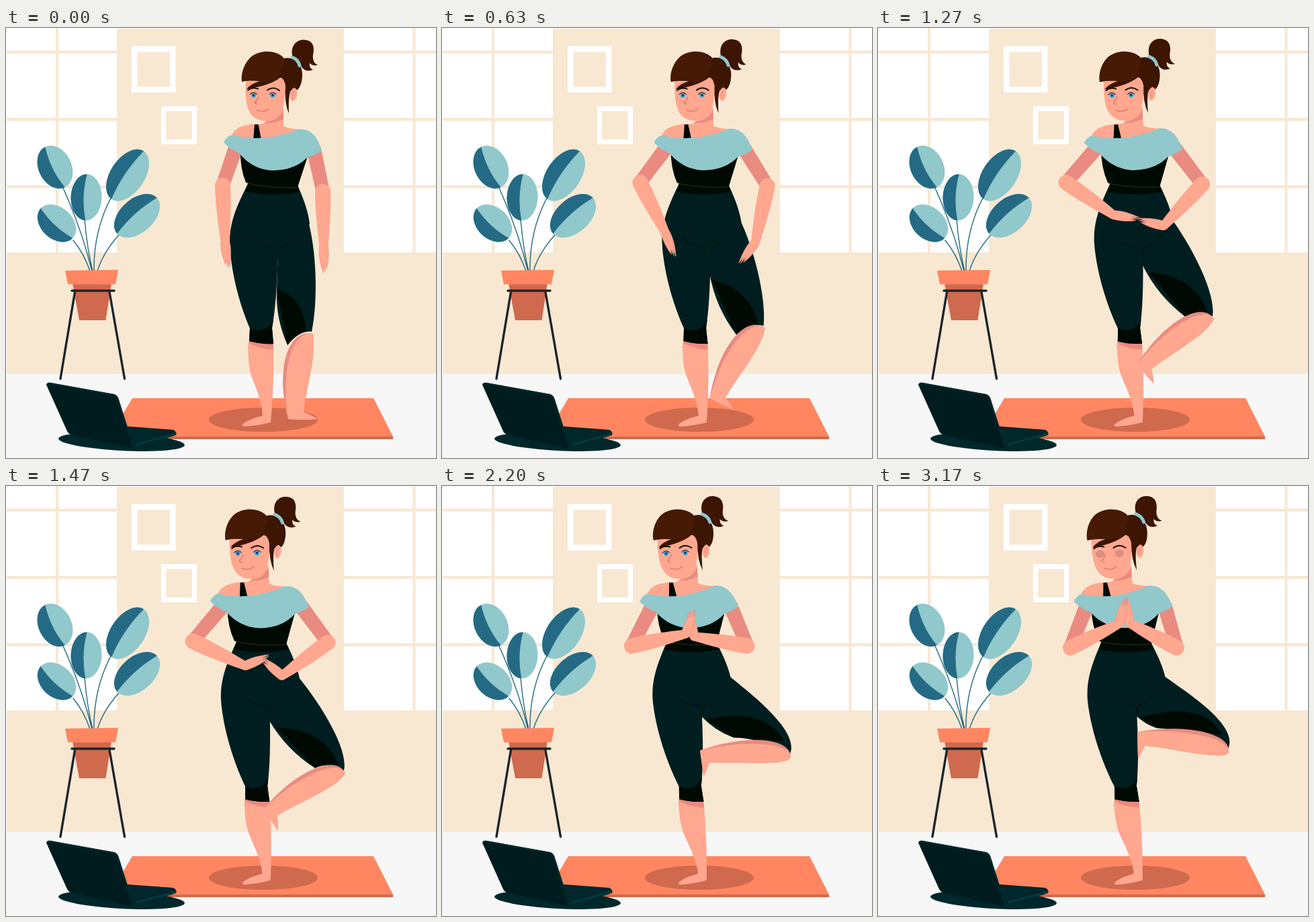
These frames come from a looping animation (640 px wide and 640 px high, 4.83 s). An HTML page:

```html
<!DOCTYPE html>
<html lang="en">
<head>
<meta charset="utf-8">
<title>Tree pose</title>
<style>
html, body { margin: 0; width: 100%; height: 100%; overflow: hidden; background: #fff; }
svg { display: block; width: 100vw; height: 100vh; }
.skin { fill: #ffa78f; } .shade { fill: #e98b80; }
.pants { fill: #001e20; } .black { fill: #000a02; }
.aqua { fill: #90c8cc; } .blue { fill: #246a84; }
.coral { fill: #ff8660; } .rust { fill: #cf6a4e; }
.wall { fill: #f8e8d2; } .hair { fill: #3c1503; }
.line { fill: none; stroke-linecap: round; }
</style>
</head>
<body>
<svg viewBox="0 0 640 640">
  <rect class="wall" x="1" y="1" width="639" height="515"/>
  <path fill="#fff" d="M0 0H165V334H0ZM503 0H640V334H503Z"/>
  <g id="bars" class="wall"></g>
  <rect y="515" width="640" height="125" fill="#f7f7f7"/>
  <g fill="none" stroke="#fff">
    <rect x="191.2" y="31.2" width="57" height="60.5" stroke-width="8.5"/>
    <rect x="234.5" y="120" width="46" height="49.5" stroke-width="7.2"/>
  </g>

  <path class="line" stroke="#246a84" stroke-width="1.4" d="M84 236Q113 300 128 362M117 285Q121 330 129 362M157 251Q130 302 131 362M168 308Q144 335 136 362M100 316Q117 337 125 362"/>
  <g id="leaves"></g>
  <path class="rust" d="M99 380H157L148.500 435H109Z"/>
  <path class="coral" d="M88 361L167 360L163 381.500H92Z"/>
  <path class="line" stroke="#1d252c" stroke-width="3.4" d="M98 391H161M102.500 393L81 522M154 393L176.500 522"/>

  <path class="rust" d="M154 608H576V612H154Z"/>
  <path class="coral" d="M188 551H547L576 608H154Z"/>
  <ellipse class="rust" cx="383" cy="583" rx="81" ry="18"/>

  <ellipse cx="172" cy="616" rx="94" ry="13" fill="#00272b" transform="rotate(3 172 616)"/>
  <path d="M168 592L249 598Q255 601 253 606L190 626Z" fill="#00272b"/>
  <path class="line" d="M194 620L252 604" stroke="#003a3f" stroke-width="3"/>
  <path d="M60 531Q61 527 67 528L160 545Q165 546 167 551L190 626L97 605Q93 604 91 600Z" fill="#001c1e"/>
  <path class="line" d="M64 529L160 546Q164 547 166 551L189 623" stroke="#00292c" stroke-width="2.500"/>

  <path id="upL" class="shade" d="M0 -11L60 -10V10L0 11Z"/>
  <path id="upR" class="shade" d="M0 -11L60 -10V10L0 11Z"/>

  <g class="hips">
    <path class="shade" d="M362 464L398 467V482L380 490L360 476Z"/>
    <path class="skin" d="M361 469Q378 478 398 479Q399 530 394 587Q375 592 355 593Q350 592 353 589Q362 582 382 577C381 552 368 528 364 514Q359 494 361 469Z"/>
    <path class="pants" d="M361 230C346 260 333 285 333 318C334 360 347 410 363 447L362 466Q380 471 398 470L396 446C402 415 404 370 405 328L452 292C450 272 441 250 434 234Z"/>
    <path class="black" d="M363 446Q386 457 398 434L396 447L398 470Q380 471 362 466Z"/>
    <path class="black" d="M361 229L433 233L437 244Q397 252 356 243Z"/>
  </g>
  <path id="thigh" class="pants"/>
  <path id="fold" class="black"/>
  <g class="hips">
    <path class="line" stroke="#000a02" d="M355 305Q376 325 405 328Q426 321 438 304M405 328V344"/>
  </g>
  <path id="calfBack" class="shade"/>
  <path id="calf" class="skin"/>

  <g class="torso">
    <path class="skin" d="M387 128L413 118V146Q420 150 438 151L440 168L335 172L336 159C341 150 350 144 371 143Q386 144 387 138Z"/>
    <path class="shade" d="M385 140Q405 138 413 122V136Q400 142 385 141.500Z"/>
    <path class="black" d="M349 180Q348 208 357 230Q390 239 434 237L450 188L400 170Z"/>
    <path class="line" d="M359 231Q390 239 433 237.500" stroke="#34403c" stroke-width=".7"/>
    <path class="black" d="M370 143.500H375.500L380 166L368 167Z"/>
    <path class="aqua" d="M324 170Q328 162 336 159Q383 172 437 150.500C455 150 465 164 470 183Q460 189 448 193C432 209 412 212 396 212C373 211 356 198 347 186Q335 182 324 170Z"/>
  </g>

  <g class="torso">
    <path class="hair" d="M427 45C421 24 436 15 447 18C459 20 459 32 457 40C456 48 459 53 464 55C459 57 454 55 452 52C451 58 454 61 457 62C448 66 441 62 438 54Z"/>
    <path class="skin" d="M357 76C356 100 357 116 363 126C370 137 384 141 396 136C408 131 414 118 415 100L420 75Z"/>
    <path class="hair" d="M403 50Q418 40 432 48Q442 58 441 72Q440 86 434 92L424 93Q420 100 421 127Q414 112 416 86Q414 74 408 74Q392 86 358 91Q364 83 378 79Z"/>
    <ellipse class="skin" cx="428" cy="99" rx="5.200" ry="10" transform="rotate(10 428 99)"/>
    <path class="line" stroke="#e98b80" d="M430 94Q425 97 427 104"/>
    <path fill="#461a04" d="M351 80C349 66 356 50 366 42C380 32 402 33 413 44C415 55 410 72 398 78C385 82 370 76 351 80Z"/>
    <path class="line" stroke="#90c8cc" stroke-width="5" stroke-linecap="butt" d="M426 43.500Q435 47 437 56"/>
    <g id="eyes"></g>
    <path class="line" stroke="#140800" stroke-width="1.900" d="M360 92.500Q366 87.500 375 90.500M389 92.500Q398 86 407 93"/>
    <path class="line" stroke="#c9705f" stroke-width="1.100" d="M376 102Q374 108 370 111Q371 113 374 113M373 122Q382 126.500 391 121"/>
    <clipPath id="lid"><rect id="lidBox" x="355" y="94.500" width="60" height="0"/></clipPath>
    <g id="lids" fill="#d98f7f" clip-path="url(#lid)"></g>
  </g>

  <g id="arms"></g>
</svg>
<script>
const $ = id => document.getElementById(id);
const LOOP = 4830, RISE = 2670;

// Steady motion that brakes to a stop at u = 1
function ease(u) {
  const speed = 1.12, brake = 2 / speed - 1;
  return u < brake ? speed * u : 1 - speed / 2 * (1 - u) ** 2 / (1 - brake);
}

const lerp = (a, b, s) => [a[0] + (b[0] - a[0]) * s, a[1] + (b[1] - a[1]) * s];
const add = (a, x, y) => [a[0] + x, a[1] + y];
const dist = (a, b) => Math.hypot(b[0] - a[0], b[1] - a[1]);

// Point on the Bezier curve through any number of control points
function track(s, ...pts) {
  while (pts.length > 1) pts = pts.slice(1).map((p, i) => lerp(pts[i], p, s));
  return pts[0];
}

// Local axes: u runs from a towards b, v to the left of it
function frame(a, b) {
  const len = dist(a, b), dx = (b[0] - a[0]) / len, dy = (b[1] - a[1]) / len;
  return (u, v) => [a[0] + dx * u + dy * v, a[1] + dy * u - dx * v];
}

// Shear above the standing foot plus a slight sideways lift
function tilt(s, lift) {
  const c = .0775 * s, b = lift * s;
  return {
    css: `matrix(1 ${-b} ${c} 1 ${-590 * c} ${380 * b})`,
    at: (x, y) => [x + c * (y - 590), y - b * (x - 380)]
  };
}

function path(id, ...parts) {
  $(id).setAttribute('d', parts.map(p => typeof p === 'string' ? p : p.map(n => n.toFixed(2)).join(' ')).join(' '));
}

function place(id, a, b, scale = 1, flip = 1) {
  const angle = Math.atan2(b[1] - a[1], b[0] - a[0]) * 180 / Math.PI;
  $(id).setAttribute('transform', `translate(${a}) rotate(${angle}) scale(${scale} ${flip})`);
}

function arm(side, shoulder, elbow, wrist, tip, flip) {
  place('up' + side, shoulder, elbow, dist(shoulder, elbow) / 60);
  place('fore' + side, elbow, wrist, dist(elbow, wrist) / 86);
  place('hand' + side, wrist, tip, 1, flip);
}

function drawThigh(s, low, knee) {
  const hip = low.at(449, 284), crotch = low.at(405, 328);
  const gap = low.at(403, 342 + 46 * (1 - s) ** 2);
  const hem = track(s, [419, 472], [432, 459], [507, 421], [414, 360]);
  const outer = frame(hip, knee), inner = frame(gap, hem);
  const len = dist(hip, knee), span = dist(gap, hem);
  const hemMid = add(lerp(knee, hem, .5), 0, -12);
  path('thigh', 'M', hip, 'C', outer(45, 11), outer(len - 50 + 37 * s, 12 + 26 * s * s), knee,
    'Q', hemMid, hem, 'Q', inner(span / 2, -.12 * span), gap, 'L', crotch, 'Z');

  const end = add(knee, -8, -23 * s * s);
  path('fold', 'M', lerp(gap, hem, .18 * s * (2 - s)), 'Q', add(end, -5 - 24 * s, -53), end,
    'Q', hemMid, hem, 'Z');
}

function drawCalf(s, knee) {
  const heel = track(s, [420, 582], [371, 542], [386, 366]);
  const toe = track(s, [464, 582], [401, 577], [387, 406]);
  const top = add(knee, 2, 3), leg = frame(top, heel), len = dist(top, heel);
  const sole = lerp(heel, toe, .5);
  const instep = lerp(sole, top, 11 / len);
  const shape = (id, inset) => {
    const bulge = -40 + 11 * s + inset;
    path(id, 'M', top, 'C', leg(3, bulge), leg(.53 * len, bulge * .95), heel,
      'Q', add(sole, 0, 2), toe, 'Q', add(lerp(toe, instep, .5), 1, -1), instep,
      'C', leg(.58 * len, 12), leg(34 * (1 - s), 15), top, 'Z');
  };
  shape('calfBack', 0);
  shape('calf', 8);
}

function draw(t) {
  const s = ease(Math.min(t / RISE, 1));
  const low = tilt(s, .02), high = tilt(s, .04);
  document.querySelectorAll('.hips').forEach(g => g.setAttribute('transform', low.css));
  document.querySelectorAll('.torso').forEach(g => g.setAttribute('transform', high.css));

  const knee = track(s, [455, 452], [504, 440], [520, 393]);
  drawThigh(s, low, knee);
  drawCalf(s, knee);

  arm('L', high.at(342, 178),
    track(s, [322.5, 234], [258, 222], [286, 241]),
    track(s, [326, 318], [319, 308], [381, 270], [359, 205]),
    track(s, [331.5, 357], [341, 392], [418, 209], [368, 166]), 1);
  arm('R', high.at(458, 180),
    track(s, [471.5, 243], [509, 223], [445, 241]),
    track(s, [473, 325], [500, 330], [367, 290], [374, 204]),
    track(s, [473, 366], [446, 396], [353, 219], [370, 167]), -1);

  const shut = Math.min(Math.max((t - 2300) / 870, 0), 1);
  $('lidBox').setAttribute('height', 13 * shut);
}

// Window bars
const bar = (x, y, w, h) => `<rect x="${x}" y="${y}" width="${w}" height="${h}"/>`;
$('bars').innerHTML = bar(74, 0, 4, 334) + bar(605.5, 0, 4, 334) +
  [0, 1, 2].map(i => bar(1, 33.7 + 100.2 * i, 639, 4.4)).join('');

// Leaves: centre, radii, turn
$('leaves').innerHTML = [
  [73, 207, 24.5, 33.5, -26], [119.5, 252, 23, 34.5, 2], [181, 219, 25.5, 43, 34],
  [195, 279.5, 25, 40, 48], [75.5, 290.5, 23.5, 32.5, -47]
].map(([x, y, rx, ry, turn]) => `<g transform="translate(${x} ${y}) rotate(${turn})">
  <ellipse class="aqua" rx="${rx}" ry="${ry}"/>
  <path class="blue" d="M0 ${-ry}A${rx} ${ry} 0 0 0 0 ${ry}Q-8 0 0 ${-ry}Z"/></g>`).join('');

const EYES = [368.5, 397];
$('eyes').innerHTML = EYES.map(x => `<g transform="translate(${x} 100)">
  <ellipse rx="5.6" ry="4.3" fill="#eebfb4"/><circle r="3.8" fill="#4a9fd0"/>
  <circle r="1.6" fill="#0a2a44"/>
  <path class="line" d="M-5.4 -1Q0 -7 5.4 -1" stroke="#3a1a10" stroke-width="1"/></g>`).join('');
$('lids').innerHTML = EYES.map(x => `<ellipse cx="${x}" cy="101" rx="6.5" ry="5.6"/>`).join('');

$('arms').innerHTML = ['R', 'L'].map(side => `
  <path id="fore${side}" class="skin" d="M0 -11.5C30 -12 60 -9 86 -6.5V6.5C60 9 30 12 0 11.5A11.5 11.5 0 0 1 0 -11.5Z"/>
  <g id="hand${side}" class="skin"><circle r="6.5"/>
  <path d="M0 -6.5C10 -8 24 -6 39 -1L27 -.6L38 1.3L26 2.3L34 4C22 7.5 10 7.5 0 6.5"
    stroke="#e98b80" stroke-width=".6"/></g>`).join('');

const start = performance.now();
function tick() {
  draw((performance.now() - start) % LOOP);
  requestAnimationFrame(tick);
}
tick();
</script>
</body>
</html>
```
